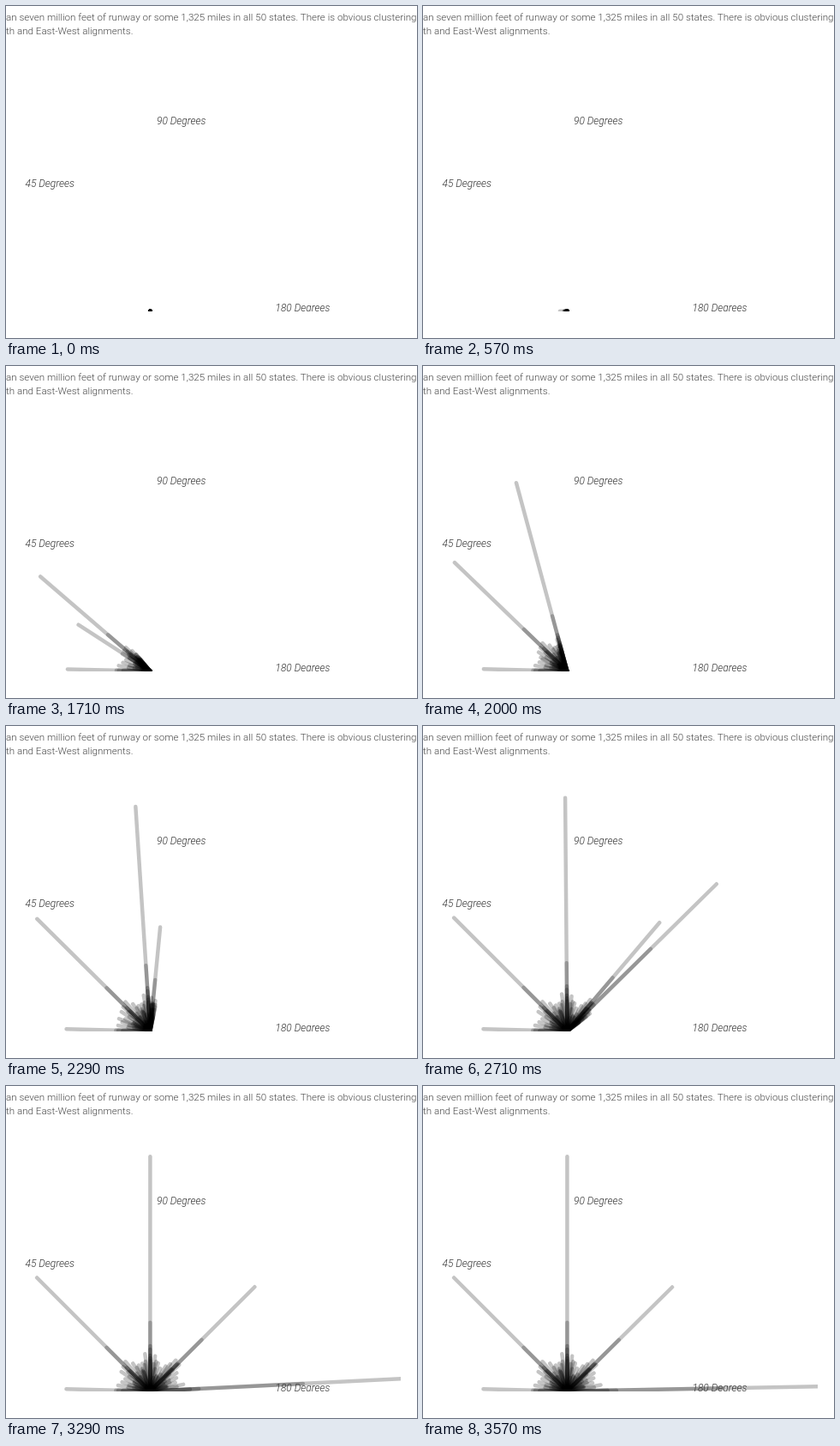
Animation, 480 px wide and 387 px high, one loop 3.71 s. Source, as an HTML page:

```html
<!DOCTYPE html>
<html lang="en">
<head>
<meta charset="utf-8">
<title>Runway headings</title>
<style>
  html, body { margin: 0; width: 100%; height: 100%; overflow: hidden; background: #fff; }
  svg { display: block; width: 480px; height: 387px; }
  text { font-family: Roboto, "Open Sans", sans-serif; font-weight: 300; }
  .copy { font-size: 11.6px; fill: #484848; }
  .label { font-size: 11.95px; font-style: italic; fill: #333; }
  #spokes { stroke: #000; stroke-opacity: .23; stroke-width: 4.5; stroke-linecap: round; }
</style>
</head>
<body>
<svg viewBox="0 0 480 387">
  <clipPath id="chart"><rect width="461" height="356"/></clipPath>
  <text class="copy" x="0" y="17">an seven million feet of runway or some 1,325 miles in all 50 states. There is obvious clustering</text>
  <text class="copy" x="0" y="33">th and East-West alignments.</text>
  <g clip-path="url(#chart)">
    <g id="spokes"></g>
    <text class="label" x="176" y="137.5">90 Degrees</text>
    <text class="label" x="22.5" y="210.5">45 Degrees</text>
    <text class="label" x="314.5" y="356">180 Degrees</text>
  </g>
</svg>
<script>
const LOOP = 3710;
const CENTER = { x: 168.4, y: 355.7 };
const RAD = Math.PI / 180;

// The clusters that stand out: heading and the two longest spokes.
const CLUSTERS = [
  { heading: 1.4, longest: 98, second: 40 },
  { heading: 45, longest: 187, second: 72 },
  { heading: 90, longest: 273.5, second: 80 },
  { heading: 135.4, longest: 172.5, second: 85 },
  { heading: 179.5, longest: 324, second: 181 }
];

let seed = 11;
function random() {
  seed = (seed * 16807) % 2147483647;
  return seed / 2147483647;
}

const group = document.getElementById("spokes");
const spokes = [];

// Higher headings start later and move a little faster.
function addSpoke(heading, length) {
  const line = document.createElementNS("http://www.w3.org/2000/svg", "line");
  line.setAttribute("x1", CENTER.x);
  line.setAttribute("y1", CENTER.y);
  group.appendChild(line);
  spokes.push({
    line, heading, length,
    halfway: 936 + 9.55 * heading - 0.0025 * heading ** 2,
    duration: 3000 - 1.5 * heading
  });
}

for (const { heading, longest, second } of CLUSTERS) {
  addSpoke(heading, longest);
  addSpoke(heading, second);
  for (let i = 0; i < 2; i++) addSpoke(heading, 32 + second * 0.3 * random());
}

// Short spokes fill the fan, longer close to each cluster.
for (let heading = 10; heading <= 170; heading += 8) {
  const nearness = (1 + Math.cos(8 * heading * RAD)) / 2;
  const length = 28 + 15 * nearness + 6 * random();
  addSpoke(heading, length);
  for (let i = 0; i < 2; i++) {
    addSpoke(heading + (random() - 0.5) * 8, length * (0.45 + 0.4 * random()));
  }
}

function expInOut(u) {
  if (u <= 0) return 0;
  if (u >= 1) return 1;
  return u < 0.5 ? 2 ** (20 * u - 11) : 1 - 2 ** (9 - 20 * u);
}

// Seven poses a second, on a 10 ms grid.
const poseTime = k => Math.round(k * 100 / 7) * 10;

function heldTime(t) {
  let k = Math.ceil(t * 7 / 1000) + 1;
  while (k > 0 && poseTime(k) > t) k--;
  return poseTime(k);
}

function draw(t) {
  for (const s of spokes) {
    const p = expInOut(0.5 + (t - s.halfway) / s.duration);
    const angle = s.heading * p * RAD;
    const r = s.length * p;
    s.line.setAttribute("x2", (CENTER.x - r * Math.cos(angle)).toFixed(2));
    s.line.setAttribute("y2", (CENTER.y - r * Math.sin(angle)).toFixed(2));
  }
}

const start = performance.now();
function tick() {
  draw(heldTime((performance.now() - start) % LOOP));
  requestAnimationFrame(tick);
}
tick();
</script>
</body>
</html>
```
